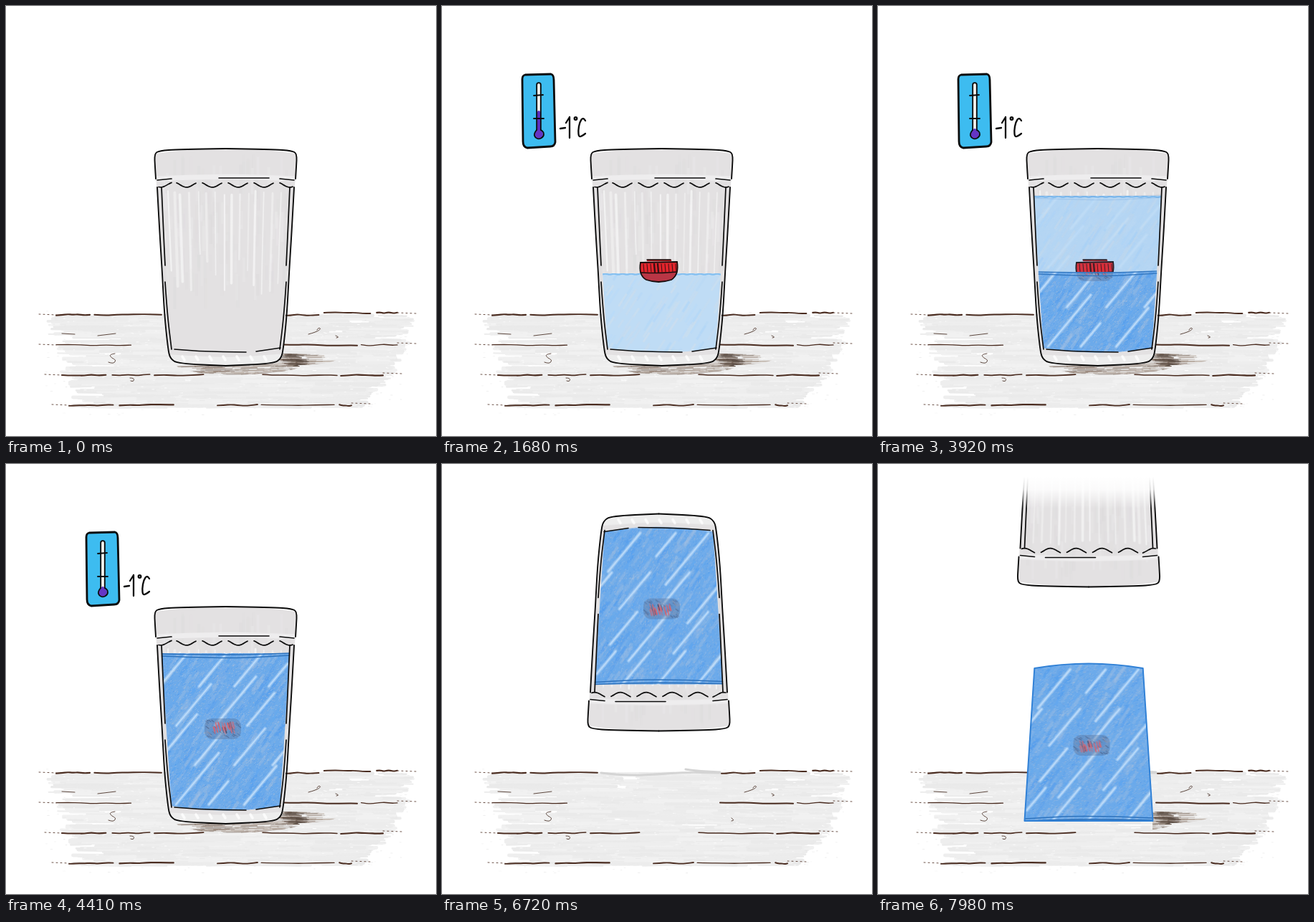
An HTML page with a canvas that plays this animation: 600x600 px, repeating every 8 s.

```html
<!DOCTYPE html>
<html lang="en">
<head>
<meta charset="utf-8">
<title>Freezing a cap in a glass</title>
<style>
html, body { margin: 0; width: 100%; height: 100%; overflow: hidden; background: #fff; }
canvas { display: block; width: 100vw; height: 100vh; }
</style>
</head>
<body>
<canvas id="stage" width="600" height="600" role="img" aria-label="A glass of water freezing at -1°C"></canvas>
<script>
const LOOP = 8000, STEP = 70, BLACK = '#0b0b0b';
const CX = 306.5, CY = 350.5; // centre of the standing glass
const g = document.getElementById('stage').getContext('2d');

let seed = 7;
const rnd = (a = 0, b = 1) => {
  seed = (seed * 16807) % 2147483647;
  return a + (b - a) * seed / 2147483647;
};
const pick = list => list[Math.floor(rnd(0, list.length))];
const ramp = (t, a, b) => Math.min(1, Math.max(0, (t - a) / (b - a)));

function faded(alpha, draw) {
  if (alpha <= 0) return;
  g.save();
  g.globalAlpha = alpha;
  draw();
  g.restore();
}

// Smooth open curve through x,y pairs
function trace(c, p) {
  c.moveTo(p[0], p[1]);
  for (let i = 2; i < p.length - 2; i += 2)
    c.quadraticCurveTo(p[i], p[i + 1], (p[i] + p[i + 2]) / 2, (p[i + 1] + p[i + 3]) / 2);
  c.lineTo(p[p.length - 2], p[p.length - 1]);
}
function ink(c, color, width, ...curves) {
  c.strokeStyle = color;
  c.lineWidth = width;
  c.lineCap = c.lineJoin = 'round';
  c.beginPath();
  curves.forEach(p => trace(c, p));
  c.stroke();
}
// Random short crayon strokes filling a box
function hatch(c, n, [x0, y0, x1, y1], dx, dy, colors, alpha, width) {
  c.lineWidth = width;
  for (let i = 0; i < n; i++) {
    const x = rnd(x0, x1), y = rnd(y0, y1), k = rnd(0.4, 1);
    c.globalAlpha = alpha * rnd(0.4, 1);
    c.strokeStyle = pick(colors);
    c.beginPath();
    c.moveTo(x, y);
    c.lineTo(x + dx * k, y + dy * k);
    c.stroke();
  }
  c.globalAlpha = 1;
}
function texture(draw) {
  const el = document.createElement('canvas');
  el.width = el.height = 600;
  draw(el.getContext('2d'));
  return el;
}

const glassShape = new Path2D(`M207 206 Q${CX} 192 406 206 L403 250 L386 488
  Q380 502 ${CX} 502 Q233 502 227 488 L210 250 Z`);
// Inside of the glass below a level
function inside(top) {
  const half = y => 89.5 - (y - 264) * .065;
  const p = new Path2D();
  p.moveTo(CX - half(top), top);
  p.lineTo(CX + half(top), top);
  p.lineTo(CX + half(477), 477);
  p.quadraticCurveTo(CX, 490, CX - half(477), 477);
  p.closePath();
  return p;
}

// Each row of boards has a left and a right run of broken lines
const rows = [[70, 220, 390, 546], [70, 183, 388, 546], [78, 281, 358, 526], [88, 234, 295, 482]];
const table = texture(c => {
  c.lineCap = 'round';
  for (let i = 0; i < 1300; i++) {
    const y = rnd(431, 560), k = (y - 431) / 129;
    const left = 48 + 38 * k + rnd(0, 18), right = 570 - 70 * k * k - rnd(0, 25);
    const x = rnd(left, right - 20);
    c.strokeStyle = pick(['#ececec', '#eeeeee', '#eaeaea', '#f1f1f1']);
    c.lineWidth = rnd(2, 5);
    c.beginPath();
    c.moveTo(x, y);
    c.lineTo(Math.min(right, x + rnd(20, 90)), y + rnd(-1, 1));
    c.stroke();
  }
  hatch(c, 500, [55, 425, 560, 572], 3, 0, ['#e8e8e8', '#fff'], .8, 1);
  ink(c, '#d4d4d4', 3, [222, 431, 260, 435, 300, 433, 340, 430, 388, 431], [340, 426, 352, 428, 388, 430]);
  rows.forEach(([a, b, d, e], row) => {
    for (const [from, to] of [[a, b], [d, e]]) {
      for (let x = from; x < to - 4;) {
        const end = Math.min(to, x + rnd(45, 110)), p = [];
        for (let i = 0; i <= 6; i++) p.push(x + (end - x) * i / 6, 431 + 42 * row - (x > 430 && !row ? 3 : 0) + rnd(-1, 1));
        ink(c, '#4a2c20', rnd(1.3, 2.2), p);
        x = end + rnd(5, 10);
      }
    }
    c.setLineDash([2, 4]);
    ink(c, '#6b5147', 1, [a - 24, 430 + 42 * row, a, 431 + 42 * row], [e, 428 + 42 * row, e + 26, 429 + 42 * row]);
    c.setLineDash([]);
  });
  ink(c, '#5c473e', 1,
    [152, 485, 144, 486, 147, 491, 154, 494, 150, 499, 143, 497],
    [173, 519, 179, 519, 178, 524, 174, 523], [422, 458, 433, 455, 440, 450, 436, 449, 434, 452],
    [460, 460, 465, 462, 461, 463], [404, 494, 408, 497, 404, 498],
    [78, 457, 96, 458], [128, 460, 153, 457]);
});

const shadow = texture(c => {
  c.clip(new Path2D('M231 497 C300 502 360 484 400 485 C490 484 475 500 405 501 C430 506 350 517 300 514 C270 514 238 507 231 497'));
  hatch(c, 230, [230, 483, 425, 515], 42, -1, ['#806b5d', '#a59384', '#66564c', '#998b81'], .6, 1.3);
  hatch(c, 60, [382, 485, 405, 502], 24, 1, ['#51443c', '#77665b'], .6, 1.5);
});

const body = texture(c => {
  c.fillStyle = '#e3e1e2';
  c.fill(glassShape);
  c.clip(glassShape);
  hatch(c, 130, [208, 205, 404, 380], 0, 45, ['#dad9da', '#ebeaeb', '#dedcdd'], .45, 4);
  ink(c, '#eeedee', 7, [212, 241, 300, 237, 403, 241]);
  ink(c, '#ededed', 11, [230, 492, 305, 497, 384, 491]);
  for (let x = 226; x < 394; x += rnd(7, 14)) {
    const lean = (CX - x) * .06;
    c.globalAlpha = rnd(.4, .85);
    ink(c, '#f6f6f6', rnd(1.5, 4), [x, rnd(257, 265), x + lean / 2, 320, x + lean, rnd(345, 415)]);
  }
  c.globalAlpha = .8;
  for (let x = 246; x < 375; x += 19) ink(c, '#fff', 3.5, [x, 489, x + 3, 494]);
});

const water = texture(c => {
  c.fillStyle = '#bfdcf5';
  c.fillRect(200, 264, 210, 230);
  hatch(c, 260, [195, 264, 400, 494], 17, -26, ['#aed5f8', '#d0dfec', '#b7dafa', '#c9dced'], .6, 3);
});

// Clear ice with the cap seen dimly through it
const ice = texture(c => {
  c.clip(inside(264));
  c.fillStyle = '#6caaea';
  c.fillRect(200, 250, 210, 250);
  hatch(c, 450, [195, 264, 400, 500], 17, -25, ['#519bec', '#92b9e4', '#9dbde2', '#5fa6f0', '#78afea'], .5, 4);
  hatch(c, 6000, [205, 260, 400, 490], 1.5, -1.5, ['#b9c2d2', '#3f8ee8', '#b2cbea', '#c2c0c9'], .65, 1);
  for (let y = 310, row = 0; y < 490; y += 55, row++)
    for (let x = 212 + row % 2 * 22; x < 385; x += 52) {
      const k = rnd(25, 62), x0 = x + rnd(-6, 6), streak = [x0, y, x0 + k, y - k * 1.2];
      c.globalAlpha = .4;
      ink(c, '#c6e0fa', 5, streak);
      c.globalAlpha = .8;
      ink(c, '#c6e2fc', 2, streak);
    }
  c.globalAlpha = .35;
  c.fillStyle = '#50678f';
  c.beginPath();
  c.roundRect(277, 355, 51, 29, 11);
  c.fill();
  hatch(c, 90, [278, 357, 324, 380], 4, 3, ['#48587c', '#7f9cc8', '#8796b4'], .6, 1.3);
  hatch(c, 26, [287, 360, 320, 368], 3, 11, ['#d8636f', '#c87786', '#d8636f', '#38415f'], .9, 1.8);
});

function cap() {
  const shape = new Path2D('M277 358 L328 357 Q331 375 320 382 Q302 388 285 382 Q274 376 277 358 Z');
  g.save();
  g.fillStyle = '#e3242c';
  g.fill(shape);
  g.clip(shape);
  g.fillStyle = '#b93645';
  g.fillRect(270, 372, 65, 16);
  g.restore();
  g.strokeStyle = '#170d0d';
  g.lineWidth = 1.8;
  g.stroke(shape);
  ink(g, '#b51d22', 2.5, [287, 355, 319, 355]);
  ink(g, '#170d0d', 1.4, [286, 354, 319, 354], [277, 372, 302, 373, 328, 371]);
  for (let x = 281; x < 327; x += 5) ink(g, '#3a1014', x > 295 && x < 305 ? 2.4 : 1, [x, 360, x + 1, 371]);
}

function glassLines() {
  const half = () => {
    ink(g, BLACK, 1.9,
      [CX, 199, 240, 200, 214, 202, 207, 206, 208, 225, 209, 241],
      [211, 253, 214, 310, 218, 372, 221, 430, 226, 478, 229, 492, 240, 499, CX, 502]);
    ink(g, BLACK, 1.7, [217, 253, 219, 300, 222, 362], [222, 385, 225, 430, 231, 479], [211, 243, 231, 241]);
  };
  half();
  g.save();
  g.translate(2 * CX, 0);
  g.scale(-1, 1);
  half();
  g.restore();
  ink(g, BLACK, 1.6, [235, 479, 270, 482, 335, 483], [349, 482, 383, 477], [297, 240, 367, 240]);
  // Broken wave under the rim
  for (let mid = 216; mid <= 396; mid += 36) {
    const p = [];
    for (let x = Math.max(213, mid - 14); x <= Math.min(401, mid + 15); x += 3)
      p.push(x, 249.5 + 3.5 * Math.cos((x - mid) * Math.PI / 18));
    ink(g, BLACK, 1.7, p);
  }
}

function pour(level) {
  g.save();
  g.clip(inside(level));
  g.drawImage(water, 0, level - 264);
  const p = [];
  for (let x = 216; x <= 400; x += 6) p.push(x, level + 1 + (x % 12 ? 1.2 : -.8));
  ink(g, '#83bff0', 2, p);
  g.restore();
}

function iceTop(y, half) {
  ink(g, '#2e73bd', 1.6, [CX - half, y, CX, y + 2, CX + half, y - 1], [CX - half, y + 3, CX, y + 7, CX + half, y + 2]);
}

function drink(t) {
  const rise = ramp(t, 70, 1530), refill = ramp(t, 2150, 3500);
  if (!rise) return;
  pour(refill ? 373 - 108 * refill : 484 - 111 * rise);
  faded(ramp(t, 70, 420), () => {
    g.translate(0, 111 * (1 - rise));
    cap();
  });
  faded(ramp(t, 1680, 2170), () => {
    iceTop(371, 82);
    g.beginPath();
    g.rect(200, 371, 210, 130);
    g.clip();
    g.drawImage(ice, 0, 0);
    iceTop(371, 82);
  });
}

function block(t) {
  g.drawImage(ice, 0, 0);
  iceTop(265, 89);
  if (t < 7560) return;
  g.strokeStyle = '#3181d6';
  g.lineWidth = 2;
  g.stroke(inside(264));
}

function thermometer(t) {
  const plate = new Path2D('M116 96 L152 95 Q156 96 156 103 L158 190 Q157 196 151 196 L119 198 Q113 197 113 189 L112 102 Q112 97 116 96 Z');
  g.fillStyle = '#3dbcf0';
  g.fill(plate);
  g.strokeStyle = BLACK;
  g.lineWidth = 2.8;
  g.stroke(plate);
  ink(g, BLACK, 7.5, [135, 110, 135, 172]);
  ink(g, '#f4f4ee', 3.8, [135, 110, 135, 173]);
  ink(g, '#5b2dbd', 4, [135, 133 + 40 * ramp(t, 1530, 1930), 135, 176]);
  g.beginPath();
  g.arc(135, 179, 6, 0, 7);
  g.fillStyle = '#6535c4';
  g.fill();
  ink(g, BLACK, 1.8, [132, 173, 128, 178, 130, 184, 136, 186, 142, 182, 142, 176, 138, 173], [128, 125, 141, 124], [128, 157, 142, 157]);
  // Hand-lettered -1°C
  ink(g, BLACK, 2.3, [165, 171, 172, 170], [173, 163, 178, 155], [178, 155, 178, 184],
    [200, 160, 197, 155, 192, 162, 190, 174, 191, 183, 196, 181, 200, 178]);
  g.beginPath();
  g.arc(186.5, 157, 1.8, 0, 7);
  g.stroke();
}

// Lift, turn over in an arc, land, then pull the glass away
function poseAt(t) {
  const lift = ramp(t, 5880, 6160), turn = ramp(t, 6300, 6720);
  const land = ramp(t, 6720, 6930), away = ramp(t, 7840, 7980);
  const arc = Math.sin(turn * Math.PI);
  return {
    x: CX + 12 * lift - 16 * turn - 28 * arc - 8.5 * land,
    y: CY - 27 * lift - 102.5 * Math.sin(turn * Math.PI / 2) - 26 * arc + 129.5 * land - 330.5 * away,
    turn
  };
}
function posed({ x, y, turn }, draw) {
  g.save();
  g.translate(x, y);
  g.rotate(turn * Math.PI);
  g.translate(-CX, -CY);
  draw();
  g.restore();
}

function dissolveTop() {
  const fade = g.createLinearGradient(0, 18, 0, 62);
  fade.addColorStop(0, '#fff');
  fade.addColorStop(.4, 'rgba(255,255,255,.85)');
  fade.addColorStop(1, 'rgba(255,255,255,0)');
  g.fillStyle = fade;
  g.fillRect(0, 0, 600, 62);
}

function draw(t) {
  g.fillStyle = '#fff';
  g.fillRect(0, 0, 600, 600);
  g.drawImage(table, 0, 0);

  faded(1 - ramp(t, 5740, 6160) + ramp(t, 6720, 6930), () => {
    g.beginPath();
    g.rect(t < 7910 ? 220 : 383, 470, 270, 60);
    g.clip();
    g.drawImage(shadow, 0, 0);
  });
  faded(ramp(t, 350, 1050) - ramp(t, 5530, 6020), () => thermometer(t));

  const pose = poseAt(t), fall = ramp(t, 7490, 7700);
  posed(pose, () => {
    g.drawImage(body, 0, 0);
    if (t < 4410) drink(t);
  });
  const icePose = fall ? { x: 294, y: CY + 61 * fall * fall, turn: 1 } : pose;
  faded(ramp(t, 3850, 4410), () => posed(icePose, () => block(t)));
  posed(pose, glassLines);
  if (t >= 7910) dissolveTop();
}

function frame(now) {
  const t = now % LOOP;
  draw(Math.floor(t / STEP) * STEP);
  requestAnimationFrame(frame);
}
requestAnimationFrame(frame);
</script>
</body>
</html>
```
